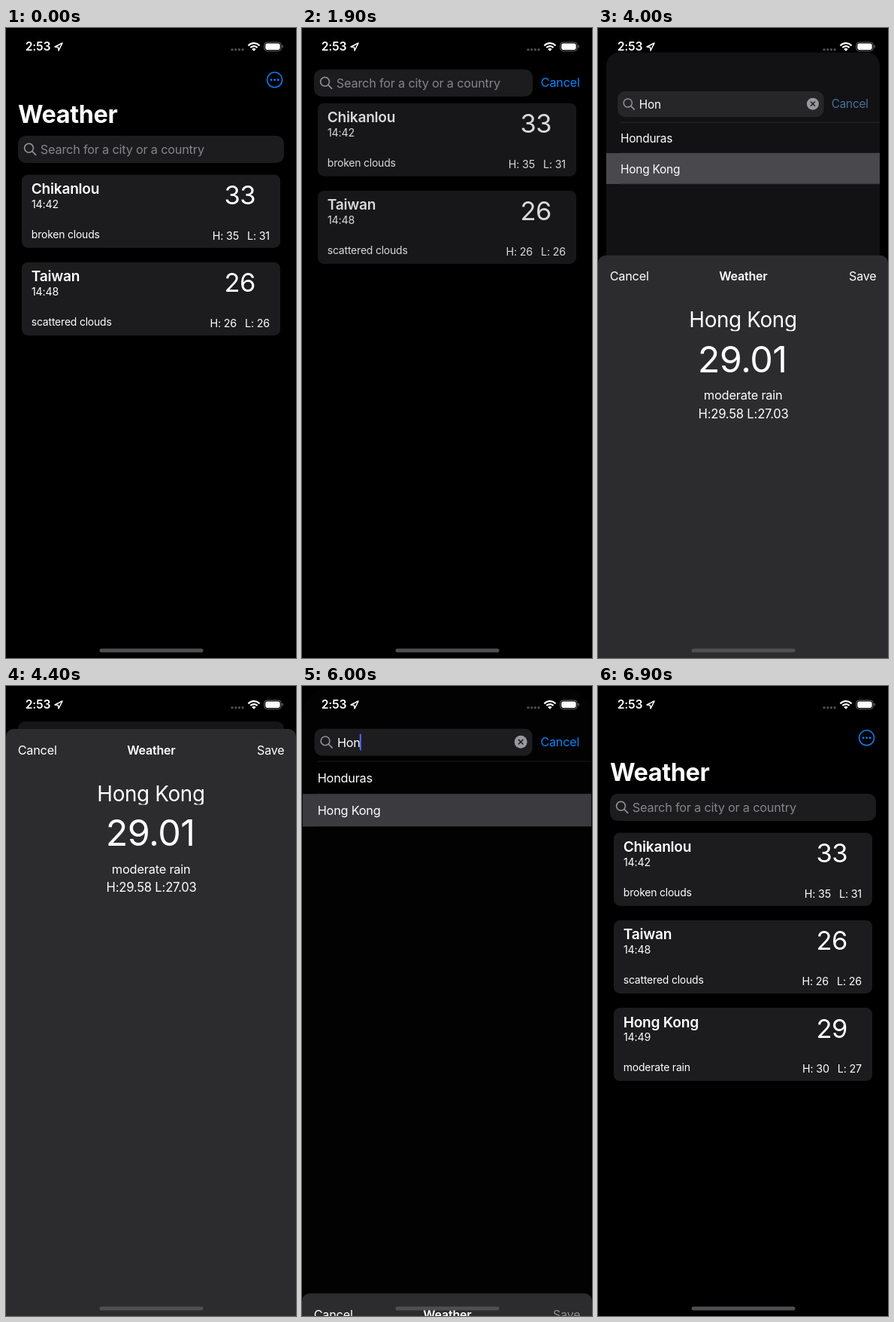
These frames come from a looping animation (386x836 px, 8 s). An HTML page with a canvas:

```html
<!DOCTYPE html>
<html lang="en">
<head>
<meta charset="utf-8">
<title>Weather</title>
<style>
  html, body { margin: 0; width: 100%; height: 100%; overflow: hidden; background: #000; }
  canvas { display: block; width: 386px; height: 836px; }
</style>
</head>
<body>
<canvas id="stage"></canvas>
<script>
const W = 386, H = 836, LOOP = 8000, STEP = 100;
const BLUE = [10, 132, 255], MUTED_BLUE = [71, 113, 158];
const canvas = document.getElementById('stage');
const ctx = canvas.getContext('2d');
const dpr = window.devicePixelRatio || 1;
canvas.width = W * dpr;
canvas.height = H * dpr;

const places = [
  { name: 'Chikanlou', time: '14:42', sky: 'broken clouds', now: 33, hi: 35, lo: 31 },
  { name: 'Taiwan', time: '14:48', sky: 'scattered clouds', now: 26, hi: 26, lo: 26 },
  { name: 'Hong Kong', time: '14:49', sky: 'moderate rain', now: 29, hi: 30, lo: 27 }
];

const results = {
  H: ['Afghanistan', 'Bahamas', 'Bahrain', 'Bangladesh', 'Bhutan', 'Bosnia and Herzegovina',
    'Chad', 'Chile', 'China', 'Christmas Island', 'Congo, The Democratic Republic of the',
    'Czech Republic', 'Ethiopia', 'French Guiana', 'French Polynesia',
    'French Southern Territories', 'Ghana'],
  Ho: ['Holy See (Vatican City State)', 'Honduras', 'Hong Kong', 'Lesotho'],
  Hon: ['Honduras', 'Hong Kong']
};

// Step tracks: [start, value]
const queryTrack = [[0, ''], [2200, 'H'], [2700, 'Ho'], [2900, 'Hon'], [6400, '']];
const caretTrack = [[0, 0], [1600, 1], [1800, 0.5], [1900, 0], [2200, 1], [3400, 0.7],
  [3500, 0], [4400, 1], [6400, 0]];

const clamp = v => Math.min(1, Math.max(0, v));
const smooth = v => { v = clamp(v); return v * v * (3 - 2 * v); };
const mix = (a, b, k) => a + (b - a) * k;
const rgb = c => `rgb(${c.map(Math.round).join(',')})`;
const valueAt = (track, t) => track.filter(k => k[0] <= t).pop()[1];

// Critically damped spring from 0 to 1
function spring(ms) {
  const x = Math.max(0, ms) * 0.01826;
  return 1 - (1 + x) * Math.exp(-x);
}

function text(str, x, y, size, color = '#fff', weight = 400, align = 'left') {
  ctx.font = `${weight} ${size}px Inter, Roboto, sans-serif`;
  ctx.letterSpacing = `${-0.012 * size}px`;
  ctx.textAlign = align;
  ctx.fillStyle = color;
  ctx.fillText(str, x, y);
  return ctx.measureText(str).width;
}

function box(x, y, w, h, r, color) {
  ctx.beginPath();
  ctx.roundRect(x, y, w, h, r);
  ctx.fillStyle = color;
  ctx.fill();
}

function dot(x, y, r, color) {
  ctx.beginPath();
  ctx.arc(x, y, r, 0, Math.PI * 2);
  ctx.fillStyle = color;
  ctx.fill();
}

function line(points, color, width) {
  ctx.beginPath();
  points.forEach(([x, y], i) => i ? ctx.lineTo(x, y) : ctx.moveTo(x, y));
  ctx.strokeStyle = color;
  ctx.lineWidth = width;
  ctx.lineCap = ctx.lineJoin = 'round';
  ctx.stroke();
}

function faded(alpha, draw) {
  ctx.save();
  ctx.globalAlpha *= clamp(alpha);
  draw();
  ctx.restore();
}

function statusBar() {
  text('2:53', 25.7, 30.3, 15.7, '#fff', 600);
  line([[65, 25], [75, 20], [70, 30], [69.4, 25.6], [65, 25]], '#fff', 1.5);
  for (let i = 0; i < 4; i++) dot(301 + i * 4.7, 28.7, 1.7, '#4c4c4e');
  ctx.strokeStyle = '#fff';
  ctx.lineCap = 'butt';
  ctx.lineWidth = 2.2;
  for (const r of [10.3, 6.4]) {
    ctx.beginPath();
    ctx.arc(330, 30.5, r, -Math.PI * 0.76, -Math.PI * 0.24);
    ctx.stroke();
  }
  ctx.beginPath();
  ctx.moveTo(330, 30.7);
  ctx.arc(330, 30.7, 3.8, -Math.PI * 0.76, -Math.PI * 0.24);
  ctx.fillStyle = '#fff';
  ctx.fill();
  ctx.beginPath();
  ctx.roundRect(343.8, 19, 22.4, 11.4, 3.6);
  ctx.strokeStyle = '#6b6b6b';
  ctx.lineWidth = 1;
  ctx.stroke();
  box(345.3, 20.5, 19.4, 8.4, 2.4, '#fff');
  box(367.4, 22.8, 1.3, 3.8, 0.6, '#6b6b6b');
}

function card(place, y) {
  box(21, y, 344, 97, 8, '#1c1c1e');
  text(place.name, 33.7, y + 25.5, 19.1, '#fff', 600);
  text(place.time, 34, y + 43.8, 14.2);
  text(place.sky, 33.8, y + 84.3, 13.9);
  text(place.now, 311.3, y + 39.5, 34.5, '#fff', 400, 'center');
  const w = text('L: ' + place.lo, 351, y + 85.8, 14.3, '#fff', 400, 'right');
  text('H: ' + place.hi, 351 - w - 11, y + 85.8, 14.3, '#fff', 400, 'right');
}

function searchField(y, width, query, caret, lift) {
  const tone = 28 + 14 * lift;
  box(16, y, width, 36, 10, rgb([tone, tone, tone + 2]));
  ctx.beginPath();
  ctx.arc(30.5, y + 16.3, 5.9, 0, Math.PI * 2);
  ctx.strokeStyle = '#929297';
  ctx.lineWidth = 1.6;
  ctx.stroke();
  line([[34.9, y + 20.7], [39.6, y + 25.4]], '#929297', 1.7);
  let end = 46;
  if (query) {
    end = 46.5 + text(query, 46.5, y + 24, 16.2);
    const x = 291.5, cy = y + 17.6;
    dot(x, cy, 8.5, '#98989d');
    line([[x - 2.8, cy - 2.8], [x + 2.8, cy + 2.8]], '#1c1c1e', 1.5);
    line([[x + 2.8, cy - 2.8], [x - 2.8, cy + 2.8]], '#1c1c1e', 1.5);
  } else {
    text('Search for a city or a country', 45.8, y + 24, 16.25, '#85858a');
  }
  faded(caret, () => box(end - 0.8, y + 7, 2, 22, 1, '#4c6bff'));
}

function resultList(names, picked, tone) {
  const top = 98.5, rowH = 43.4;
  const rule = rgb([tone + 25, tone + 25, tone + 27]);
  ctx.fillStyle = rule;
  ctx.fillRect(20, top - 0.5, W - 20, 1);
  names.forEach((name, i) => {
    const y = top + i * rowH;
    if (i === picked) {
      const c = 58 + tone * 0.8;
      ctx.fillStyle = rgb([c, c, c + 4]);
      ctx.fillRect(0, y, W, rowH);
    }
    text(name, 20.2, y + 28.2, 16.3);
    ctx.fillStyle = rule;
    ctx.fillRect(20, y + rowH - 0.5, W - 20, 1);
  });
}

function moreButton() {
  ctx.beginPath();
  ctx.arc(357.6, 68.8, 10, 0, Math.PI * 2);
  ctx.strokeStyle = '#0f76e4';
  ctx.lineWidth = 1.6;
  ctx.stroke();
  for (const d of [-4.6, 0, 4.6]) dot(357.6 + d, 68.8, 1.5, '#0f76e4');
}

function mainScreen(t, search, lift) {
  const query = valueAt(queryTrack, t);
  const tone = 40 * lift * (1 - 0.475 * lift);
  ctx.save();
  ctx.translate(16 * lift, 47 * lift);
  ctx.scale(1 - lift * 32 / W, 1 - lift * 32 / W);
  if (lift > 0) {
    ctx.beginPath();
    ctx.roundRect(0, 0, W, H, mix(39, 10, lift));
    ctx.clip();
    ctx.fillStyle = rgb([tone, tone, tone + lift * 2]);
    ctx.fillRect(0, 0, W, H);
  }
  faded(1 - search * 1.6, () => text('Weather', 16, 126 - 88 * search, 32.4, '#fff', 700));
  faded(1 - search, moreButton);
  if (query) {
    resultList(results[query], t >= 3800 ? 1 : -1, tone);
  } else {
    const count = t >= 6400 ? 3 : 2;
    faded(1 - 0.16 * search, () => places.slice(0, count)
      .forEach((place, i) => card(place, 194.7 - 95 * search + i * 116.2)));
  }
  searchField(143 - 88 * search, 354 - 63 * search, query, valueAt(caretTrack, t), lift);
  const k = clamp(lift / 0.59);
  const color = rgb(BLUE.map((c, i) => mix(c, MUTED_BLUE[i], k)));
  faded(search * (t >= 6500 ? 0.4 : 1), () =>
    text('Cancel', 317.8 + 68 * (1 - search), 78, 16.2, color));
  ctx.restore();
}

function sheet(lift, saving) {
  ctx.save();
  ctx.translate(0, H - (H - 57) * lift);
  box(0, 0, W, H, [10, 10, 0, 0], '#2c2c2e');
  text('Cancel', 15.7, 33.7, 16.2);
  text('Weather', 193.3, 33.7, 16, '#fff', 600, 'center');
  text('Save', 370.5, 33.7, 16.1, saving ? '#8b8b8d' : '#fff', 400, 'right');
  ctx.save();
  ctx.beginPath();
  ctx.rect(0, 60, W, 40.6);
  ctx.clip();
  text('Hong Kong', 193, 95.7, 27.8, '#fff', 400, 'center');
  ctx.restore();
  text('29.01', 192.1, 155.4, 48.5, '#fff', 400, 'center');
  text('moderate rain', 193.2, 191.7, 16.35, '#fff', 400, 'center');
  text('H:29.58 L:27.03', 193.6, 216, 16.6, '#fff', 400, 'center');
  ctx.restore();
}

function render(t) {
  const search = smooth((t - 1150) / 400) - smooth((t - 6550) / 350);
  const raw = spring(t - 3870) - spring(t - 5723);
  const lift = raw < 0.001 ? 0 : raw > 0.999 ? 1 : raw;
  ctx.setTransform(dpr, 0, 0, dpr, 0, 0);
  ctx.fillStyle = '#000';
  ctx.fillRect(0, 0, W, H);
  mainScreen(t, search, lift);
  if (lift > 0) sheet(lift, t >= 5600);
  statusBar();
  box(124.5, 823.5, 138, 5, 2.5, '#4f4f51');
}

const start = performance.now();
function tick() {
  const t = (performance.now() - start) % LOOP;
  render(Math.floor(t / STEP) * STEP);
  requestAnimationFrame(tick);
}
tick();
</script>
</body>
</html>
```
